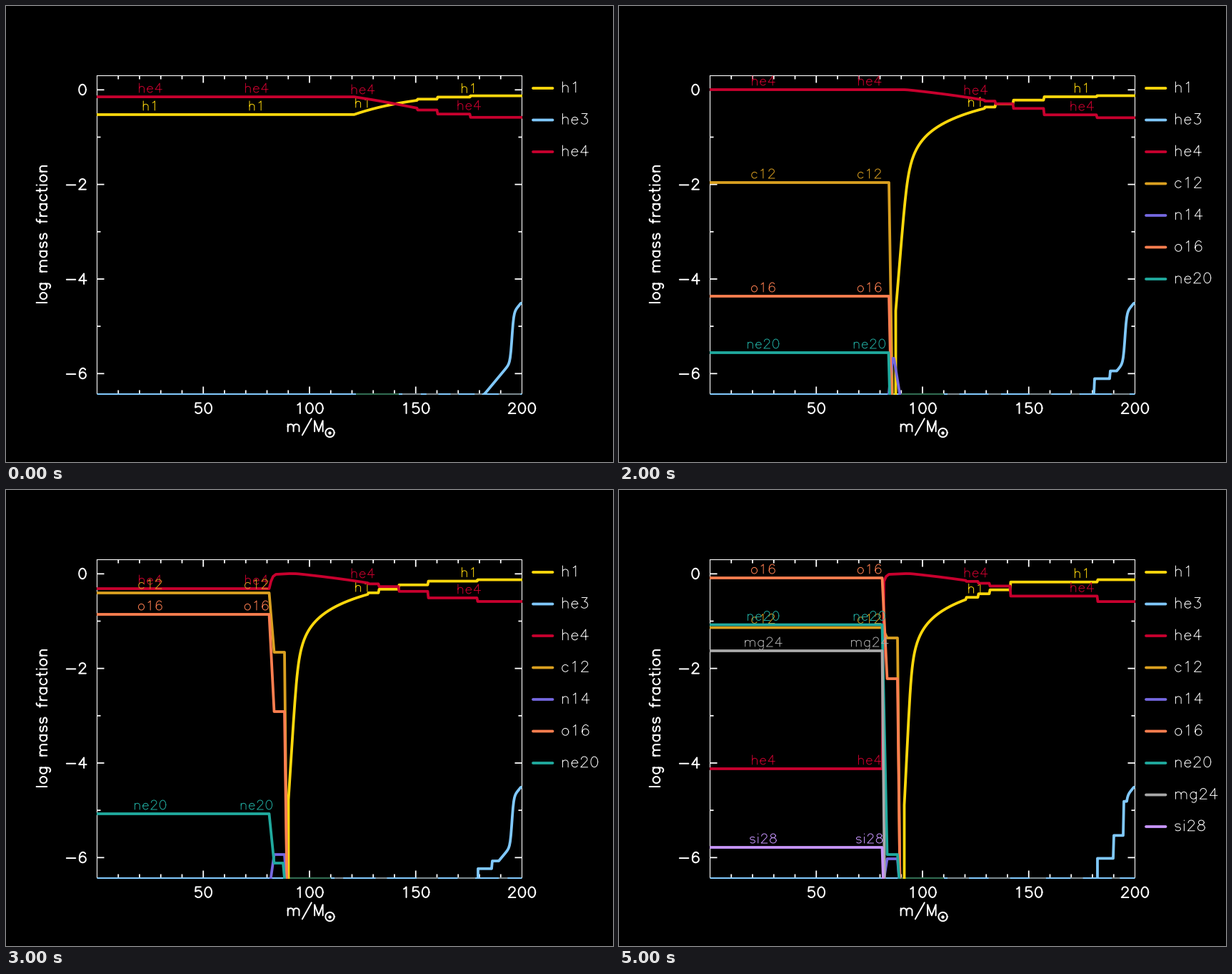
A matplotlib script that plays this animation: 850 px wide and 638 px high, repeating every 6000 ms.

```python
import numpy as np
import matplotlib.pyplot as plt
from matplotlib.animation import ArtistAnimation
from matplotlib.patches import Rectangle

W, H, DPI = 850, 638, 100
PX = 72 / DPI
LEFT, RIGHT, TOP, BOTTOM = 127.5, 722.5, 97.5, 542.5
ZERO, DEX = 117.0, 66.17          # height of log 0, pixels per decade
BELOW = 560                       # hidden under the floor
WHITE = "#ffffff"

fig = plt.figure(figsize=(W / DPI, H / DPI), dpi=DPI, facecolor="black")
ax = fig.add_axes([0, 0, 1, 1])
ax.set(xlim=(0, W), ylim=(H, 0))
ax.axis("off")
box = Rectangle((LEFT - 0.5, TOP), RIGHT - LEFT + 1, BOTTOM - TOP + 1.5,
                transform=ax.transData)


def stroke(x, y, color, width, clip=False, cap="round"):
    line, = ax.plot(x, y, color=color, lw=width * PX, solid_capstyle=cap,
                    solid_joinstyle="round", snap=False)
    if clip:
        line.set_clip_path(box)
    return line


# ---- stroke font built from stems and arcs: caps 21 units, x-height 14 ----
def arc(cx, cy, rx, ry, a=0, b=360, n=17):
    t = np.radians(np.linspace(a, b, n))
    return np.column_stack([cx + rx * np.cos(t), cy + ry * np.sin(t)])


def path(*parts):
    return np.vstack(parts)


def stem(x, top):
    return path((x, top), (x, 0))


def arch(x):
    return path((x, 9.5), arc(x + 5.5, 9, 5.5, 5, 160, 0), (x + 11, 0))


BOWL = arc(9.5, 7, 6.5, 7, 35, 325)
BAR = path((2, 14), (9, 14))
BELLY = arc(10, 7, 7, 7, 125, -145)

GLYPHS = {
    " ": (16, []),
    "a": (19, [BOWL, stem(15, 14)]),
    "c": (18, [BOWL]),
    "e": (18, [path((3, 8), arc(9.3, 7, 6.3, 7, 10, 325))]),
    "f": (12, [path(arc(9, 17, 4, 4, 75, 180), (5, 0)), BAR]),
    "g": (19, [BOWL, path((15, 14), arc(10, -2, 5, 5, 0, -140))]),
    "h": (19, [stem(4, 21), arch(4)]),
    "i": (8, [stem(4, 14), path((4, 21), (4, 20))]),
    "l": (8, [stem(4, 21)]),
    "m": (30, [stem(4, 14), arch(4), arch(15)]),
    "n": (19, [stem(4, 14), arch(4)]),
    "o": (19, [arc(9.5, 7, 6.5, 7)]),
    "r": (13, [stem(4, 14), arc(10, 8, 6, 6, 180, 75)]),
    "s": (17, [path(arc(8.5, 10.7, 5.3, 3.3, 30, 270),
                    arc(8.5, 3.7, 5.5, 3.7, 90, -150))]),
    "t": (12, [path((5, 21), arc(9, 4, 4, 4, 180, 285)), BAR]),
    "M": (24, [path(stem(4, 21)[::-1], (12, 0), stem(20, 21))]),
    "/": (22, [path((20, 25), (2, -7))]),
    "-": (26, [path((4, 9), (22, 9))]),
    "0": (20, [arc(10, 10.5, 7, 10.5)]),
    "1": (20, [path((6, 17), (8, 18), stem(11, 21))]),
    "2": (20, [path(arc(10, 15.5, 6, 5.5, 180, -25), (3, 0), (17, 0))]),
    "3": (20, [path((5, 21), (16, 21), (10, 13),
                    arc(10, 6.5, 7, 6.5, 90, -150))]),
    "4": (20, [path(stem(13, 21)[::-1], (3, 7), (18, 7))]),
    "5": (20, [path((15, 21), (5, 21), (4, 12), BELLY)]),
    "6": (20, [path(arc(11, 10.5, 7, 10.5, 45, 180),
                    arc(10.5, 6.5, 6.5, 6.5, 180, -180))]),
    "8": (20, [arc(10, 16.5, 5.5, 4.5), arc(10, 6, 7, 6)]),
}


def text(s, x, y, size, color=WHITE, width=1.0, anchor=0.0, upright=True):
    """Baseline at (x, y); anchor 0, .5, 1 is left, centre, right."""
    pen = -anchor * sum(GLYPHS[ch][0] for ch in s)
    parts = []
    for ch in s:
        adv, strokes = GLYPHS[ch]
        for p in strokes:
            parts += [p + (pen, 0), (np.nan, np.nan)]
        pen += adv
    u, v = path(*parts).T * size
    if upright:
        return stroke(x + u, y - v, color, width)
    return stroke(x - v, y - u, color, width)


# ---- fixed plot frame ----
def draw_frame():
    stroke([LEFT, RIGHT, RIGHT, LEFT, LEFT],
           [TOP, TOP, BOTTOM, BOTTOM, TOP], WHITE, 1.1, cap="projecting")
    for k in range(1, 20):
        x, n = LEFT + k * 29.75, 5 if k % 5 else 10
        for y0, y1 in ((TOP, TOP + n), (BOTTOM, BOTTOM - n)):
            stroke([x, x], [y0, y1], WHITE, 1.8, cap="butt")
    for k in range(7):
        y, n = ZERO + 0.3 + k * DEX, 5 if k % 2 else 10
        for x0, x1 in ((LEFT, LEFT + n), (RIGHT, RIGHT - n)):
            stroke([x0, x1], [y, y], WHITE, 1.8, cap="butt")
        if k % 2 == 0:
            text(f"-{k}" if k else "0", 114, y + 7, 0.695, width=2, anchor=1)
    for m in (50, 100, 150, 200):
        text(str(m), LEFT + m * 2.975, 570, 0.695, width=2, anchor=0.5)
    text("log mass fraction", 57.3, 319.5, 0.7, width=2, anchor=0.5,
         upright=False)
    text("m/M", 391.8, 595.3, 0.72, width=2)
    stroke(*arc(453.5, 597, 6.2, 6.2).T, WHITE, 2)
    ax.plot([453.5], [597], "o", color=WHITE, ms=4.5 * PX, mew=0)


# ---- curves, in stage pixels ----
def mixed(x, edges, part):
    """Sample position per x: each zone takes the value at one point of it."""
    pos = x.copy()
    for a, b in zip(edges, edges[1:]):
        pos[(x >= a) & (x <= b)] = a + part * (b - a)
    return pos


def hydrogen(start, edges, gap=8.5, core=0):
    """Linear rise that saturates at the surface, mixed flat in zones."""
    x = np.arange(LEFT if core else start - gap, RIGHT + 0.5)
    pos = mixed(x, [*edges, RIGHT + 1], 0.5)
    soft = gap / 6
    u = 0.0048 * soft * np.logaddexp(0, (pos - start) / soft)
    frac = np.maximum(0.76 * u / (1 + u ** 6) ** (1 / 6), core)
    curve = np.column_stack([x, ZERO - DEX * np.log10(frac)])
    return curve if core else path((x[0], BELOW), curve)


def helium(h1, core=None):
    """What hydrogen leaves over, around an optional burnt core."""
    x, y = h1.T
    outer = np.column_stack(
        [x, ZERO - DEX * np.log10(1 - 10 ** ((ZERO - y) / DEX))])
    if core is None:
        return path((LEFT, outer[0, 1]), outer)
    return path((LEFT, core), (368.5, core), (371, 128), (374, 121),
                (378, 118), outer)


def helium3(start, *edges):
    """Slope with a steep step near the surface, mixed in zones."""
    x = np.arange(start, RIGHT - 1)
    pos = mixed(x.astype(float), edges, 1)
    y = 543 - 1.2 * (pos - 670) - 33 * (1 + np.tanh((pos - 708.5) / 2.5))
    return path((start, BOTTOM), np.column_stack([x, np.minimum(y, BOTTOM)]))


def shell(core, ledge=None, edge=368.5, end=390, drop=3.5):
    """Flat core, then straight down or by way of a lower ledge."""
    if ledge is None:
        return path((LEFT, core), (edge, core), (edge + drop, BELOW))
    return path((LEFT, core), (edge, core), (edge + 7, ledge), (end, ledge),
                (end + drop, BELOW))


h1_a = hydrogen(406, (576, 604, 650), core=0.296)
h1_b = hydrogen(401.5, (512, 527, 552.5, 595, 669), gap=14)
h1_c = hydrogen(406.5, (507, 522, 550, 591.5, 660), gap=11)
h1_d = hydrogen(407, (502, 519, 548.5, 589.5, 675.5))
h1_e = hydrogen(408, (486, 503, 519, 548, 670.5))
he3_zones = (666, 688, 697)

SCENES = [
    {"h1": h1_a, "he4": helium(h1_a), "he3": helium3(670)},
    {"h1": h1_b, "he4": helium(h1_b), "he3": helium3(645, *he3_zones),
     "c12": shell(499.5, edge=379), "n14": shell(496, edge=384, drop=12)},
    {"h1": h1_b, "he4": helium(h1_b), "he3": helium3(664, *he3_zones),
     "c12": shell(247, edge=378, drop=5),
     "n14": shell(BELOW, 493, edge=376, end=385, drop=11),
     "o16": shell(406, edge=378), "ne20": shell(485, edge=377.5, drop=2)},
    {"h1": h1_c, "he4": helium(h1_c, 138), "he3": helium3(661, 661, 681, 690),
     "c12": shell(144, 227), "n14": shell(BELOW, 510),
     "o16": shell(174, 310), "ne20": shell(453, 522, end=388)},
    {"h1": h1_d, "he4": helium(h1_d, 197),
     "he3": helium3(675, 675, 693, 700, 708),
     "c12": shell(168, 209), "n14": shell(BELOW, 514),
     "o16": shell(125, 269), "ne20": shell(253, 513),
     "mg24": shell(342)},
    {"h1": h1_e, "he4": helium(h1_e, 390),
     "he3": helium3(670, 670, 693, 707, 711),
     "c12": shell(192.5, 207), "n14": shell(BELOW, 516),
     "o16": shell(123, 264), "ne20": shell(188.5, 510),
     "mg24": shell(225), "si28": shell(500, drop=2)},
]

COLORS = {"h1": "#ffd80c", "he3": "#80c8fc", "he4": "#c8002e",
          "c12": "#daa020", "n14": "#7568e0", "o16": "#ff7f50",
          "ne20": "#20aa9e", "mg24": "#a9a9a9", "si28": "#c896ff"}


def draw_floor(green, seed):
    """Blue floor line with a green stretch and scattered grey ones."""
    rng = np.random.default_rng(seed)
    spans = [(LEFT, RIGHT, COLORS["he3"]), (green, green + 60, "#2f6b50")]
    spans += [(a, a + rng.uniform(10, 35), "#78868c")
              for a in np.linspace(green + 65, 690, 5)]
    return [stroke([a, b], [BOTTOM + 0.5] * 2, tint, 2, cap="butt")
            for a, b, tint in spans]


def draw_scene(i, curves):
    art = draw_floor(395 if i else 490, i)
    for k, (name, color) in enumerate(COLORS.items()):
        if name not in curves:
            continue
        x, y = curves[name].T
        art.append(stroke(x, y, color, 3.8, clip=True))
        for m in (25, 75, 125, 175):
            cx = LEFT + m * 2.975
            cy = np.interp(cx, x, y)
            if x[0] <= cx <= x[-1] and cy <= BOTTOM:
                art.append(text(name, cx, cy - 6, 0.62, color, anchor=0.5))
        row = 115 + 44.5 * k
        art.append(stroke([738, 765.5], [row, row], color, 3.8))
        art.append(text(name, 776.6, row + 5.8, 0.705))
    return art


draw_frame()
scenes = [draw_scene(i, c) for i, c in enumerate(SCENES)]
anim = ArtistAnimation(fig, scenes, interval=1000, repeat=True,
                       repeat_delay=0, blit=False)
plt.show()
```
